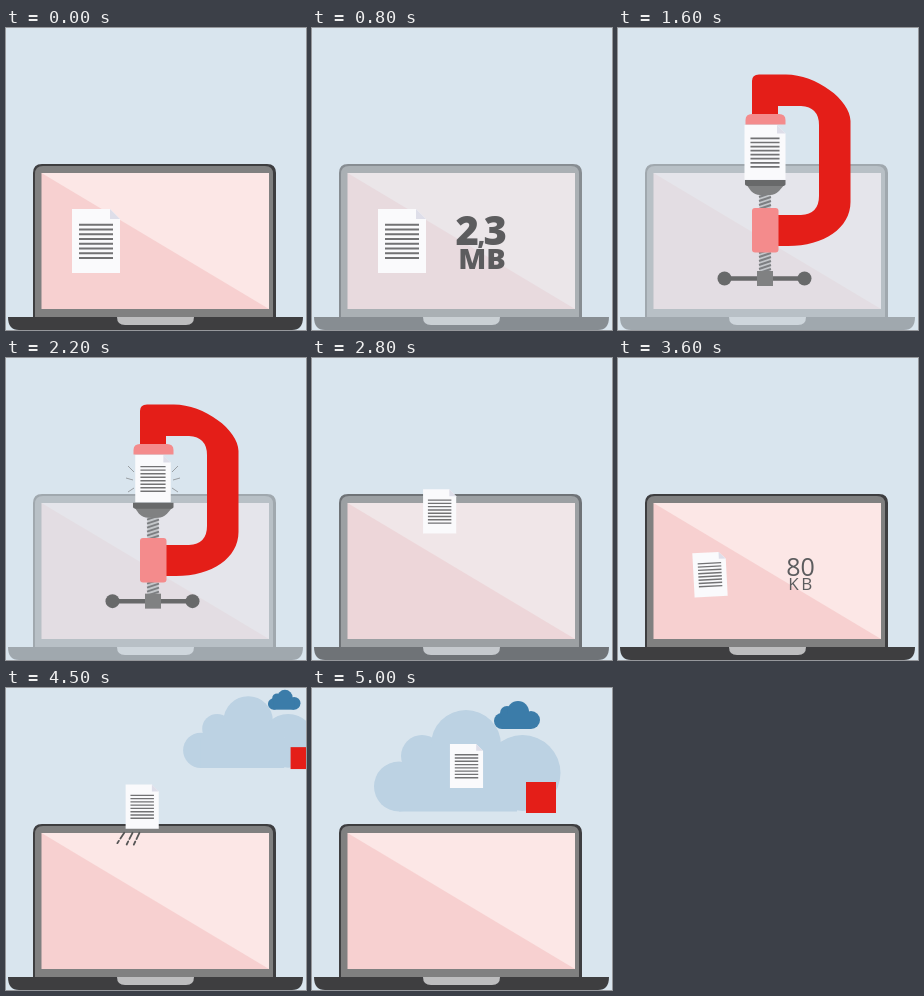
An HTML page that plays this animation: 300 px wide and 302 px high, repeating every 5400 ms.

```html
<!DOCTYPE html>
<html lang="en">
<head>
<meta charset="utf-8">
<title>File compression</title>
<style>
  html, body { margin: 0; width: 100%; height: 100%; overflow: hidden; background: #d9e5ee; }
  svg { display: block; width: 100vw; height: 100vh; }
  text { font-family: "Open Sans", "Noto Sans", sans-serif; fill: #5c5c5e; text-anchor: middle; }
  .big { font-weight: 800; }
</style>
</head>
<body>
<svg viewBox="0 0 300 302">
  <g id="laptop">
    <path fill="#3e3e40" d="M27 290V145Q27 136 36 136H261Q270 136 270 145V290Z"/>
    <path fill="#808080" d="M29 289V146Q29 138 37 138H259Q267 138 267 146V289Z"/>
    <path fill="#f7d0d0" d="M35.500 145H263V281H35.500Z"/>
    <path fill="#fce7e6" d="M35.500 145H263V281Z"/>
    <path fill="#3e3e40" d="M2 289H297Q297 302 286 302H13Q2 302 2 289Z"/>
    <path fill="#bdbdbe" d="M111 289H188Q188 297 180 297H119Q111 297 111 289Z"/>
  </g>

  <g id="before">
    <text class="big" x="168.500" y="217" font-size="40" letter-spacing="-1.500">2<tspan font-size="25">,</tspan>3</text>
    <text class="big" x="170" y="241" font-size="29">MB</text>
  </g>
  <g id="after">
    <text x="182.500" y="218" font-size="25">80</text>
    <text x="183.500" y="232" font-size="17" letter-spacing="2.500">KB</text>
  </g>

  <g id="sky">
    <g fill="#bcd2e3">
      <circle cx="87" cy="98.500" r="25"/>
      <circle cx="110" cy="68" r="21"/>
      <circle cx="154" cy="57" r="35"/>
      <circle cx="210.500" cy="85" r="38"/>
      <path d="M87 80L110 60H205V123.500H87Z"/>
    </g>
    <g fill="#3b7ca9">
      <circle cx="190" cy="33" r="8"/>
      <circle cx="195" cy="25" r="7"/>
      <circle cx="206" cy="24" r="11"/>
      <circle cx="219" cy="32" r="9"/>
      <path d="M190 26H219V41H190Z"/>
    </g>
    <rect x="214" y="94" width="30" height="31" fill="#e41e18"/>
  </g>

  <path id="frame" fill="#e41e18" d="M134 90V53Q134 46.500 141 46.500H168C198 46.500 232.500 72 232.500 93V174C232.500 200 206 218 170 218H158V187H183Q201 186 201 168V97Q201 79 183 78H160V90Z"/>

  <g id="page">
    <path id="trail" fill="none" stroke="#555" stroke-width="2.600" stroke-linecap="round" stroke-dasharray="10 4 5 9" d="M-26 38L-36 53M-14 38L-25 60M-4 38L-14 59"/>
    <path fill="#fafafc" d="M-24 -32H14L24 -22V32H-24Z"/>
    <path fill="#dedee9" d="M14 -32V-22H24Z"/>
    <path id="lines" stroke="#727274" stroke-width="2"/>
  </g>

  <g id="clamp">
    <g id="screw">
      <path fill="#c3c6c9" d="M141.500 160H152.500V246H141.500Z"/>
      <path id="thread" stroke="#7d7f82" stroke-width="1.900"/>
      <path fill="#808182" d="M128 156H167L161 163Q157 167 152 167H142Q137 167 133 163Z"/>
      <path fill="#68696a" d="M127 152H167.500V156Q167.500 158 164 158H131Q127 158 127 156Z"/>
      <path stroke="#68696a" stroke-width="4.500" d="M106 250.500H186.500"/>
      <path fill="#808182" d="M139 243H155V258H139Z"/>
      <circle cx="106.500" cy="250.500" r="7" fill="#68696a"/>
      <circle cx="186.500" cy="250.500" r="7" fill="#68696a"/>
    </g>
    <path fill="#f48b8c" d="M127.500 96.500V92Q127.500 86 134 86H161Q167.500 86 167.500 92V96.500Z"/>
    <rect x="134" y="180" width="26.500" height="44.500" rx="3" fill="#f48b8c"/>
  </g>
  <path id="sparks" stroke="#9a9fa3" stroke-width="1" d="M128 114L122 108M127 122L120 120M128 130L122 134M166 114L172 108M167 122L174 120M166 130L172 134"/>
</svg>
<script>
const LOOP = 5400, STEP = 100;
const el = {};
document.querySelectorAll('[id]').forEach(e => el[e.id] = e);

const repeat = (n, fn) => Array.from({ length: n }, (_, i) => fn(i)).join('');
el.lines.setAttribute('d', repeat(8, i => `M-17 ${-16.3 + i * 4.75}h34`));
el.thread.setAttribute('d', repeat(21, i => `M141 ${165 + i * 4}l12 -4`));

// Linear interpolation through [time, value] points
function track(t, ...keys) {
  if (t <= keys[0][0]) return keys[0][1];
  for (let i = 1; i < keys.length; i++) {
    const [t0, a] = keys[i - 1], [t1, b] = keys[i];
    if (t <= t1) return a + (b - a) * (t - t0) / (t1 - t0);
  }
  return keys[keys.length - 1][1];
}
const smooth = k => k * k * (3 - 2 * k);
const mix = (a, b, k) => a + (b - a) * k;
const move = (e, value) => e.setAttribute('transform', value);
const fade = (e, value) => e.setAttribute('opacity', value);
const zoom = (e, x, y, s) => move(e, `translate(${x * (1 - s)} ${y * (1 - s)}) scale(${s})`);

function draw(t) {
  const size = track(t, [1100, 1], [1400, .92], [1600, .855], [2200, .74], [2300, .69]);
  const toClamp = smooth(track(t, [900, 0], [1300, 1]));
  const toScreen = smooth(track(t, [2600, 0], [3100, 1]));
  const rise = Math.sin(track(t, [4000, 0], [5000, 1]) * Math.PI / 2);

  fade(el.laptop, track(t, [500, 1], [900, .36], [2600, .36], [3000, 1]));

  fade(el.before, track(t, [200, 0], [500, 1], [800, 1], [1100, 0]));
  zoom(el.before, 169, 215, track(t, [200, .5], [600, 1]));
  fade(el.after, track(t, [3200, 0], [3500, 1], [3800, 1], [4100, 0]));
  zoom(el.after, 182, 216, track(t, [3200, .6], [3600, 1]));

  // Page: screen, clamp, screen again, cloud
  let x = mix(90, 147, toClamp), y = mix(213, 97 + 32 * size, toClamp);
  x = mix(mix(x, 92, toScreen), 154.500, rise);
  y = mix(mix(y, 216.500, toScreen), 78, rise);
  const tilt = t > 3200 && t < 3800 ? -3 * Math.cos((t - 3600) / 200 * Math.PI) : 0;
  move(el.page, `translate(${x} ${y}) rotate(${tilt}) scale(${size})`);
  fade(el.trail, t > 4000 && t < 4800 ? 1 : 0);

  const grip = track(t, [1100, 0], [1500, 1], [2300, 1], [2500, 0]);
  fade(el.frame, grip);
  fade(el.clamp, grip);
  move(el.screw, `translate(0 ${64 * (size - .855)})`);
  fade(el.sparks, t >= 2100 && t < 2400 ? 1 : 0);

  zoom(el.sky, 455, -25, rise);
  fade(el.sky, rise > 0 ? 1 : 0);
}

function tick() {
  draw(Math.floor(performance.now() % LOOP / STEP) * STEP);
  requestAnimationFrame(tick);
}
tick();
</script>
</body>
</html>
```
